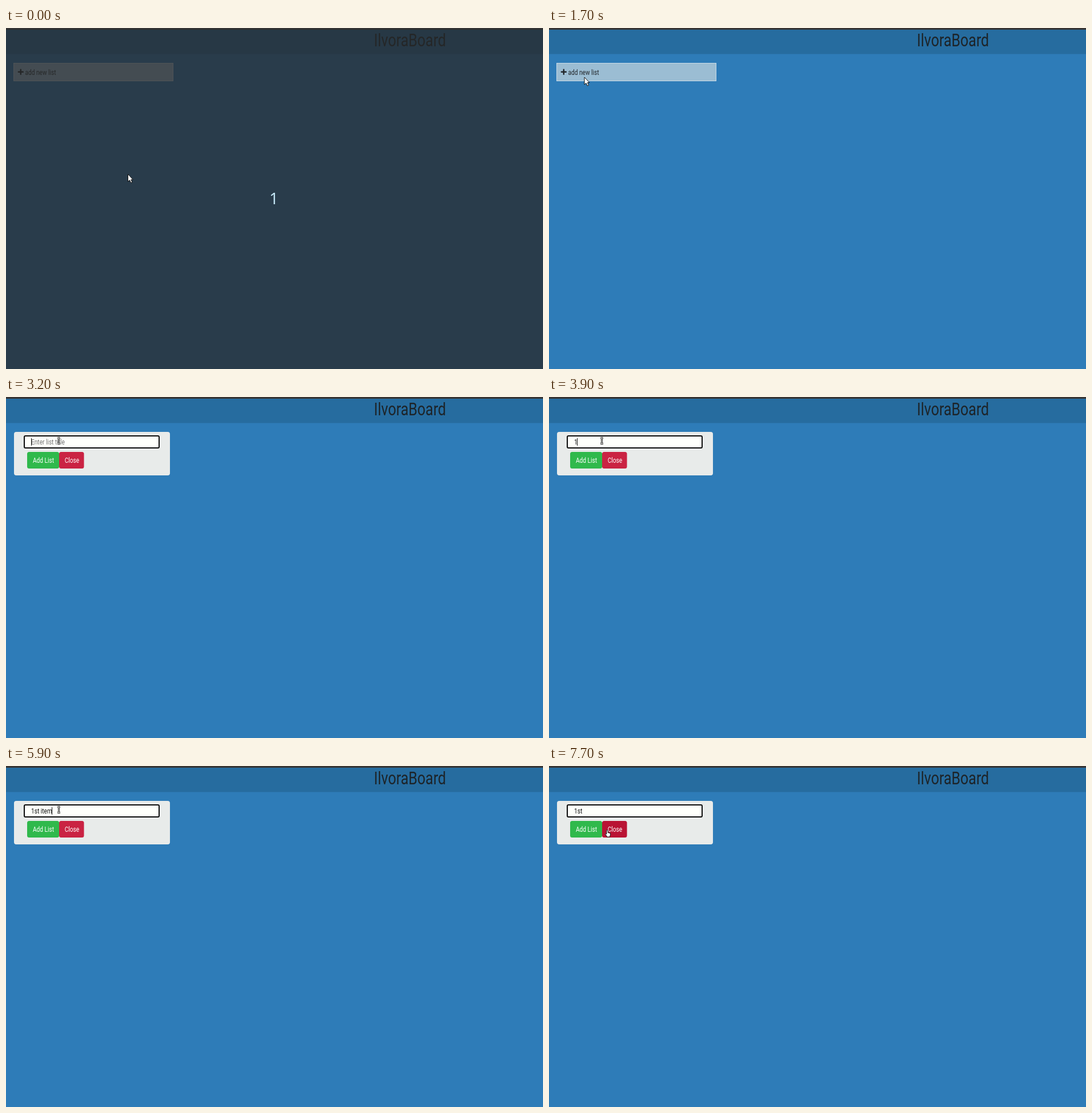
An HTML page for the animation above (8000 ms loop, 940 by 596 pixels).

```html
<!DOCTYPE html>
<html lang="en">
<head>
<meta charset="utf-8">
<title>Board demo</title>
<style>
  html, body { margin: 0; width: 100%; height: 100%; overflow: hidden; background: #2e7cb8; }
  svg { display: block; width: 940px; height: 596px; }
  text { font: 13px Roboto, "Open Sans", sans-serif; fill: #212529; white-space: pre; }
  .title { font-size: 32px; fill: #1d2429; }
  .count { font: 28px "Open Sans", "Noto Sans", sans-serif; fill: #cdf0ff; text-anchor: middle; }
  .light { fill: #fff; }
  .hint { fill: #757575; }
  .typed { fill: #111; }
  .outlined { fill: #fff; stroke: #111; stroke-linejoin: round; }
</style>
</head>
<body>
<svg viewBox="0 0 940 596">
  <rect width="940" height="596" fill="#2e7cb8"/>
  <rect width="940" height="45.5" fill="#266c9f"/>
  <rect width="940" height="3" fill="#353535"/>
  <text class="title" transform="translate(644 32) scale(.78 1)">IlvoraBoard</text>

  <g id="opener">
    <rect x="13.5" y="61.5" width="279" height="31" fill="#9bbdd3" stroke="#c8dbe7"/>
    <path d="M25.8 72.8v8M21.8 76.8h8" stroke="#212529" stroke-width="2.4" stroke-linecap="round"/>
    <text transform="translate(33.5 81.5) scale(.78 1)">add new list</text>
  </g>

  <g id="form">
    <rect x="14" y="61" width="273" height="76" rx="4" fill="#e8ebea"/>
    <rect id="field" fill="#fefffb" rx="2"/>
    <text class="hint" id="hint" transform="translate(44 83) scale(.78 1)">Enter list title</text>
    <text class="typed" id="typed" transform="translate(44 83) scale(.78 1)"></text>
    <rect id="caret" y="72" width="1" height="13" fill="#111"/>
    <rect x="37" y="96" width="56" height="29" rx="3.5" fill="#30b94c"/>
    <text class="light" transform="translate(47 115) scale(.78 1)">Add List</text>
    <rect id="close" x="93" y="96" width="43.5" height="29" rx="3.5"/>
    <text class="light" transform="translate(102.7 115) scale(.78 1)">Close</text>
  </g>

  <g id="countdown">
    <rect y="2" width="940" height="594" fill="#272727" fill-opacity=".75"/>
    <text class="count" x="469" y="308">1</text>
  </g>

  <g id="pointer">
    <path id="arrow" class="outlined" d="M0 0V13L3 10.3L5.2 15L7.5 14L5.3 9.5H8.8Z"/>
    <g id="beam" fill="none">
      <path d="M-2.5-5H2.5M0-5V5M-2.5 5H2.5" stroke="#222" stroke-width="3"/>
      <path d="M-2.5-5H2.5M0-5V5M-2.5 5H2.5" stroke="#f4f4f0"/>
    </g>
    <path id="hand" class="outlined" d="M-1.2 1Q0-.6 1.2 1V5L5.5 6Q6 9 4.6 11V12.5H-1V11L-3.6 7.6Q-3.4 6-1.2 7.6Z"/>
  </g>
</svg>
<script>
  const LOOP = 8000;
  const CONDENSE = 0.78;
  const el = id => document.getElementById(id);
  const show = (id, on) => el(id).setAttribute("display", on ? "inline" : "none");
  const set = (id, attrs) => {
    for (const [name, value] of Object.entries(attrs)) el(id).setAttribute(name, value);
  };

  // Each step is [start time, ...values]; the latest one reached applies.
  const current = (steps, t) => steps.filter(step => step[0] <= t).pop();

  const pointerSteps = [
    [0, "arrow", 213.5, 255.5],
    [1300, "arrow", 180, 220],
    [1400, "arrow", 122, 160],
    [1500, "arrow", 85, 119.5],
    [1700, "arrow", 62, 86],
    [1800, "hand", 47, 63.5],
    [2400, "arrow", 46.5, 63.5],
    [2600, "beam", 64, 73.5],
    [2700, "beam", 82, 76],
    [2800, "beam", 92.5, 76.5],
    [6300, "beam", 91.5, 76.5],
    [6500, "arrow", 1, 103],
    [6600, "hand", 70, 119],
    [6700, "hand", 102, 111.5]
  ];

  const typingSteps = [
    [0, ""], [3900, "1"], [4100, "1s"], [4400, "1st"], [5200, "1st "],
    [5300, "1st i"], [5500, "1st it"], [5700, "1st ite"], [5900, "1st item"],
    [7000, "1st ite"], [7200, "1st it"], [7400, "1st i"], [7600, "1st "]
  ];

  const caretSteps = [
    [0, false], [3200, true], [3600, false], [3900, true],
    [6500, false], [7000, true], [7700, false]
  ];

  const closeSteps = [[0, "#ca2343"], [6700, "#c11c3c"], [6800, "#b91334"]];

  function drawField(t) {
    const focused = t >= 3200;
    const line = focused ? 2 : 1;
    set("field", {
      x: 31 + line / 2, y: 67 + line / 2,
      width: 238 - line, height: 23 - line,
      "stroke-width": line,
      stroke: focused ? "#0c0c0c" : t >= 2600 ? "#555" : "#767676"
    });

    const text = current(typingSteps, t)[1];
    const typed = el("typed");
    if (typed.textContent !== text) typed.textContent = text;
    show("hint", !text);
    show("caret", current(caretSteps, t)[1]);
    const length = text ? typed.getComputedTextLength() : 0;
    set("caret", { x: Math.floor(44 + length * CONDENSE) });
  }

  function drawPointer(t) {
    const [, shape, x, y] = current(pointerSteps, t);
    for (const name of ["arrow", "beam", "hand"]) show(name, name === shape);
    set("pointer", { transform: `translate(${x} ${y})` });
  }

  function render() {
    const t = performance.now() % LOOP;
    show("countdown", t < 500);
    show("opener", t < 2400);
    show("form", t >= 2400);
    drawField(t);
    set("close", { fill: current(closeSteps, t)[1] });
    drawPointer(t);
    requestAnimationFrame(render);
  }
  render();
</script>
</body>
</html>
```
